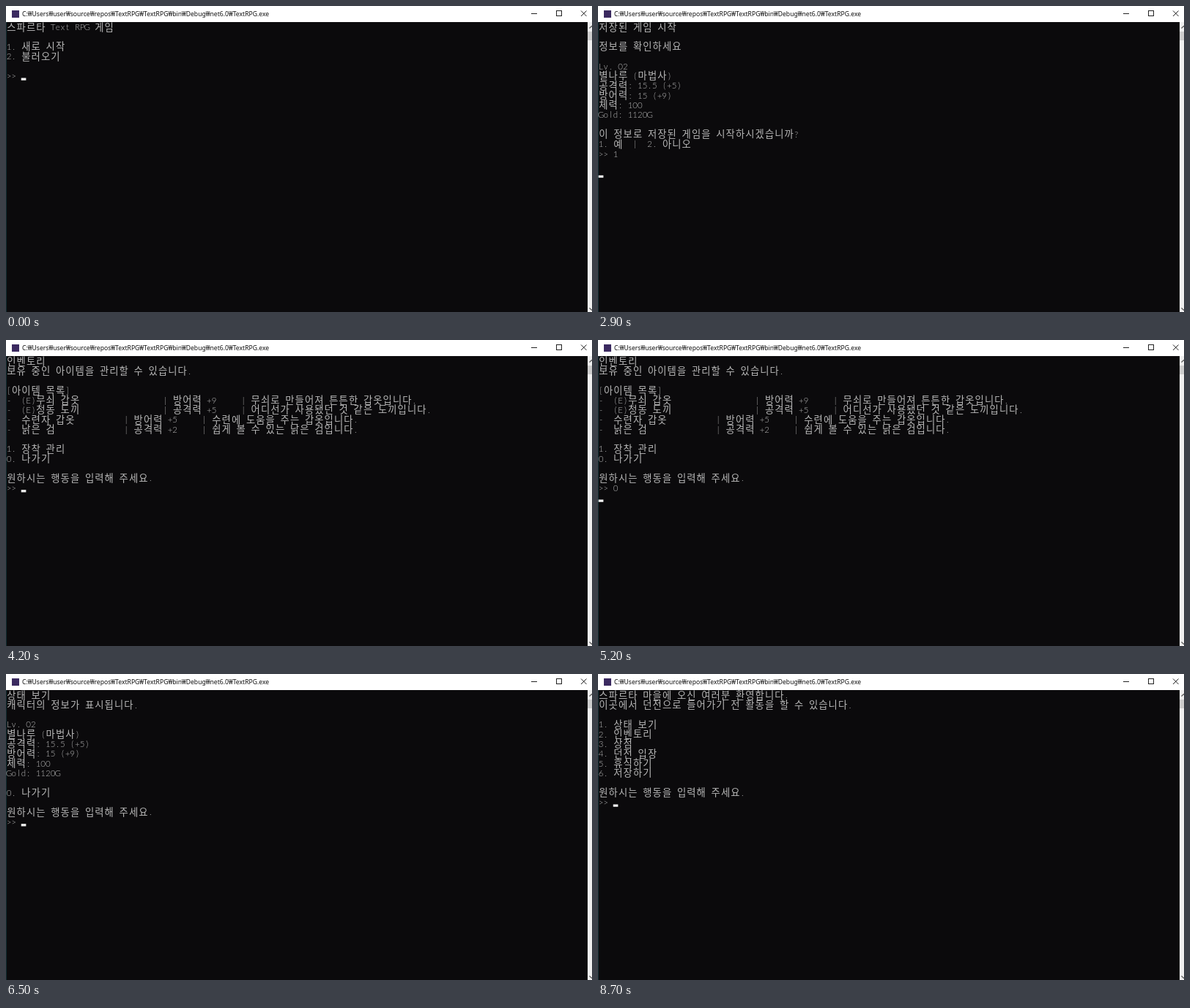
Animation of 800x419 px, one loop 8800 ms. Source, as an HTML page with a canvas:

```html
<!DOCTYPE html>
<html lang="ko">
<head>
<meta charset="utf-8">
<title>TextRPG</title>
<style>
  html, body { margin: 0; width: 100%; height: 100%; overflow: hidden; background: #0b0a0c; }
  canvas { display: block; }
</style>
</head>
<body>
<canvas id="stage" width="800" height="419"></canvas>
<script>
const ctx = document.getElementById('stage').getContext('2d');
const LOOP = 8800;
const CELL = 20 / 3, ROW = 40 / 3, LEFT = 0.7, TOP = 22.5;
const WIDE_FONT = '300 13.33px "Noto Sans CJK KR", "Noto Sans CJK", sans-serif';
const NARROW_FONT = '300 11.5px Lato, "Noto Sans CJK KR", sans-serif';
const TITLE_FONT = '8.6px "Noto Sans", "Open Sans", sans-serif';
const PATH = 'C:₩Users₩user₩source₩repos₩TextRPG₩TextRPG₩bin₩Debug₩net6.0₩TextRPG.exe';

const isWide = ch => ch.charCodeAt(0) >= 0x1100;
const cells = text => [...text].reduce((n, ch) => n + (isWide(ch) ? 2 : 1), 0);
const pad = (text, width) => text + ' '.repeat(Math.max(0, width - cells(text)));

// One inventory line; the first divider stands at column `col`.
const item = (name, stat, col, info) =>
  pad(pad('-  ' + name, col) + '| ' + stat, col + 16) + '| ' + info;

const ASK = '원하시는 행동을 입력해 주세요.';
const HERO = ['Lv. 02', '별나루 (마법사)', '공격력: 15.5 (+5)', '방어력: 15 (+9)', '체력: 100', 'Gold: 1120G'];

// The prompt follows the last line of each screen.
const SCREENS = {
  start: ['스파르타 Text RPG 게임', '', '1. 새로 시작', '2. 불러오기', ''],
  load: ['저장된 게임 시작', '', '정보를 확인하세요', '', ...HERO, '',
    '이 정보로 저장된 게임을 시작하시겠습니까?', '1. 예  |  2. 아니오'],
  town: ['스파르타 마을에 오신 여러분 환영합니다.', '이곳에서 던전으로 들어가기 전 활동을 할 수 있습니다.', '',
    '1. 상태 보기', '2. 인벤토리', '3. 상점', '4. 던전 입장', '5. 휴식하기', '6. 저장하기', '', ASK],
  bag: ['인벤토리', '보유 중인 아이템을 관리할 수 있습니다.', '', '[아이템 목록]',
    item('(E)무쇠 갑옷', '방어력 +9', 32, '무쇠로 만들어져 튼튼한 갑옷입니다.'),
    item('(E)청동 도끼', '공격력 +5', 32, '어디선가 사용됐던 것 같은 도끼입니다.'),
    item('수련자 갑옷', '방어력 +5', 24, '수련에 도움을 주는 갑옷입니다.'),
    item('낡은 검', '공격력 +2', 24, '쉽게 볼 수 있는 낡은 검입니다.'),
    '', '1. 장착 관리', '0. 나가기', '', ASK],
  status: ['상태 보기', '캐릭터의 정보가 표시됩니다.', '', ...HERO, '', '0. 나가기', '', ASK]
};

// Start time, screen, typed input, cursor: off, at the input, or n rows below it.
const OFF = -1, ON = 0;
const STEPS = [
  [0, 'start', '', ON], [100, 'start', '2', ON],
  [600, 'load', '', ON], [1600, 'load', '', OFF], [2000, 'load', '', ON], [2300, 'load', '', OFF],
  [2700, 'load', '1', ON], [2900, 'load', '1', 2],
  [3000, 'town', '', ON], [3400, 'town', '', OFF], [3800, 'town', '2', ON],
  [4100, 'bag', '', ON], [4800, 'bag', '', OFF], [5000, 'bag', '0', ON], [5200, 'bag', '0', 1],
  [5300, 'town', '', ON], [5800, 'town', '1', ON], [6000, 'town', '1', OFF],
  [6100, 'status', '', ON], [6600, 'status', '', OFF], [7000, 'status', '', ON],
  [7400, 'status', '0', ON], [7600, 'status', '0', OFF],
  [7700, 'town', '', ON], [8400, 'town', '', OFF], [8700, 'town', '', ON]
];

function box(color, x, y, w, h) {
  ctx.fillStyle = color;
  ctx.fillRect(x, y, w, h);
}

function line(color, ...points) {
  ctx.strokeStyle = color;
  ctx.beginPath();
  points.forEach(([x, y]) => ctx.lineTo(x, y));
  ctx.stroke();
}

function printLine(text, row) {
  let col = 0;
  ctx.fillStyle = '#b8b8b8';
  ctx.textAlign = 'center';
  for (const ch of text) {
    const wide = isWide(ch), span = wide ? 2 : 1;
    ctx.font = wide ? WIDE_FONT : NARROW_FONT;
    ctx.fillText(ch, LEFT + (col + span / 2) * CELL, TOP + row * ROW + (wide ? 11.3 : 10.8));
    col += span;
  }
}

function drawCursor(col, row) {
  box('#f2f2f2', LEFT + col * CELL, TOP + (row + 1) * ROW - 4, CELL, 3.3);
}

function drawWindow() {
  box('#0b0a0c', 0, 0, 800, 419);
  box('#123a40', 0, 22, 0.7, 397);
  box('#ffffff', 0, 0, 800, 22);
  box('#3b2a60', 8, 6, 10, 10);

  ctx.fillStyle = '#111111';
  ctx.font = TITLE_FONT;
  ctx.textAlign = 'left';
  ctx.fillText(PATH, 22, 13.8);

  ctx.lineWidth = 1;
  line('#222222', [717, 10.5], [725, 10.5]);
  ctx.strokeRect(751.5, 6.5, 7, 7);
  line('#222222', [785, 6.5], [792.5, 14]);
  line('#222222', [792.5, 6.5], [785, 14]);

  box('#f0f0f0', 794, 22, 6, 397);
  box('#cdcdcd', 794, 35, 6, 12);
  ctx.lineWidth = 1.2;
  line('#555555', [796.5, 30.5], [799.5, 27.5], [802.5, 30.5]);
  line('#555555', [796.5, 413.5], [799.5, 416.5], [802.5, 413.5]);
}

function draw(time) {
  const [, name, input, cursor] = STEPS.findLast(step => step[0] <= time);
  const lines = SCREENS[name], promptRow = lines.length;
  drawWindow();
  lines.forEach(printLine);
  printLine('>> ' + input, promptRow);
  if (cursor === ON) drawCursor(3 + input.length, promptRow);
  else if (cursor > 0) drawCursor(0, promptRow + cursor);
}

function tick() {
  draw(performance.now() % LOOP);
  requestAnimationFrame(tick);
}
tick();
</script>
</body>
</html>
```
